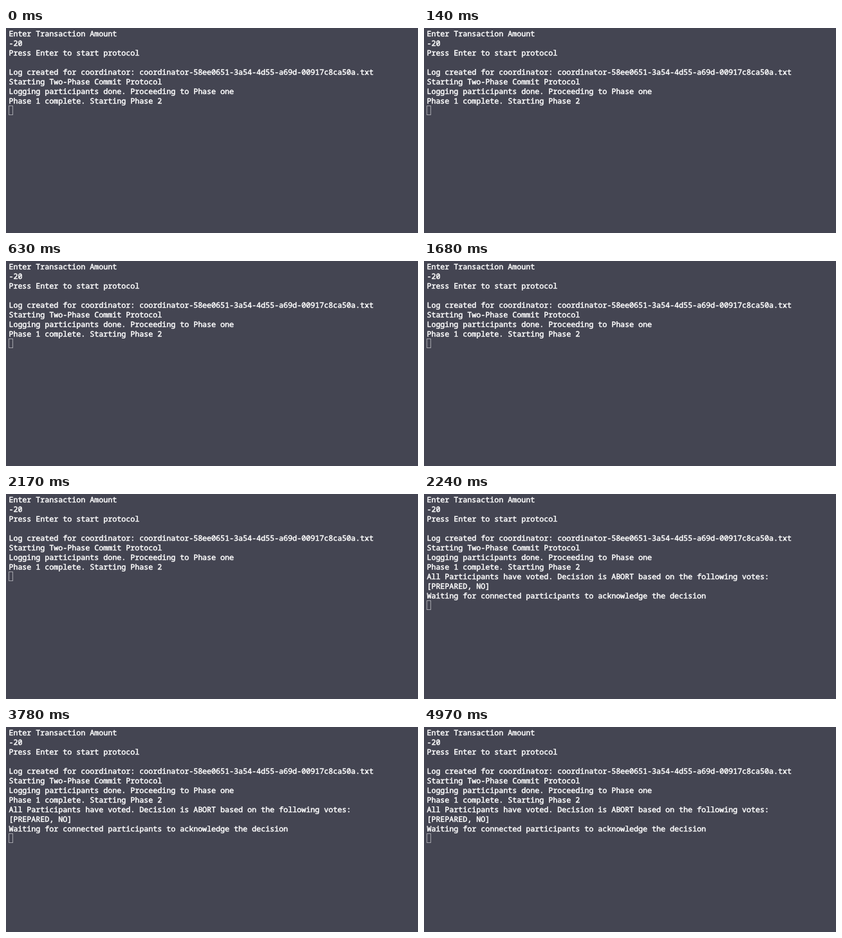
Animation, 640 px wide and 320 px high, one loop 5320 ms. Source, as an HTML page:

```html
<!DOCTYPE html>
<html lang="en">
<head>
<meta charset="utf-8">
<title>Two-phase commit</title>
<style>
  html, body { margin: 0; width: 100%; height: 100%; overflow: hidden; background: #444552; }
  #screen { position: absolute; left: 0; top: 0; width: 640px; height: 320px; overflow: hidden; background: #444552; }
  pre {
    position: absolute; left: 4.4px; top: 2px; margin: 0;
    font: 500 11.6667px/15px "Noto Sans Mono", "DejaVu Sans Mono", monospace;
    color: #fff; -webkit-text-stroke: 0.5px #fff;
    font-variant-ligatures: none; text-rendering: geometricPrecision;
  }
  #cursor {
    position: absolute; left: 4px; top: 121px; width: 7px; height: 15px;
    box-sizing: border-box; border: 1px solid #a3a3aa;
  }
</style>
</head>
<body>
<div id="screen"><pre id="log"></pre><div id="cursor"></div></div>
<script>
const LOOP = 5320;
const ROW = 15;

// Each step adds its lines at the given time.
const steps = [
  { at: 0, lines: [
    "Enter Transaction Amount",
    "-20",
    "Press Enter to start protocol",
    "",
    "Log created for coordinator: coordinator-58ee0651-3a54-4d55-a69d-00917c8ca50a.txt",
    "Starting Two-Phase Commit Protocol",
    "Logging participants done. Proceeding to Phase one",
    "Phase 1 complete. Starting Phase 2"
  ] },
  { at: 2240, lines: [
    "All Participants have voted. Decision is ABORT based on the following votes:",
    "[PREPARED, NO]",
    "Waiting for connected participants to acknowledge the decision"
  ] }
];

const log = document.getElementById("log");
const cursor = document.getElementById("cursor");
let shown = 0;

function draw(now) {
  const time = now % LOOP;
  const lines = steps.filter(s => s.at <= time).flatMap(s => s.lines);
  if (lines.length !== shown) {
    shown = lines.length;
    log.textContent = lines.join("\n");
    cursor.style.top = 1 + shown * ROW + "px";
  }
}

draw(0);
const start = performance.now();
function tick() {
  draw(performance.now() - start);
  requestAnimationFrame(tick);
}
requestAnimationFrame(tick);
</script>
</body>
</html>
```
